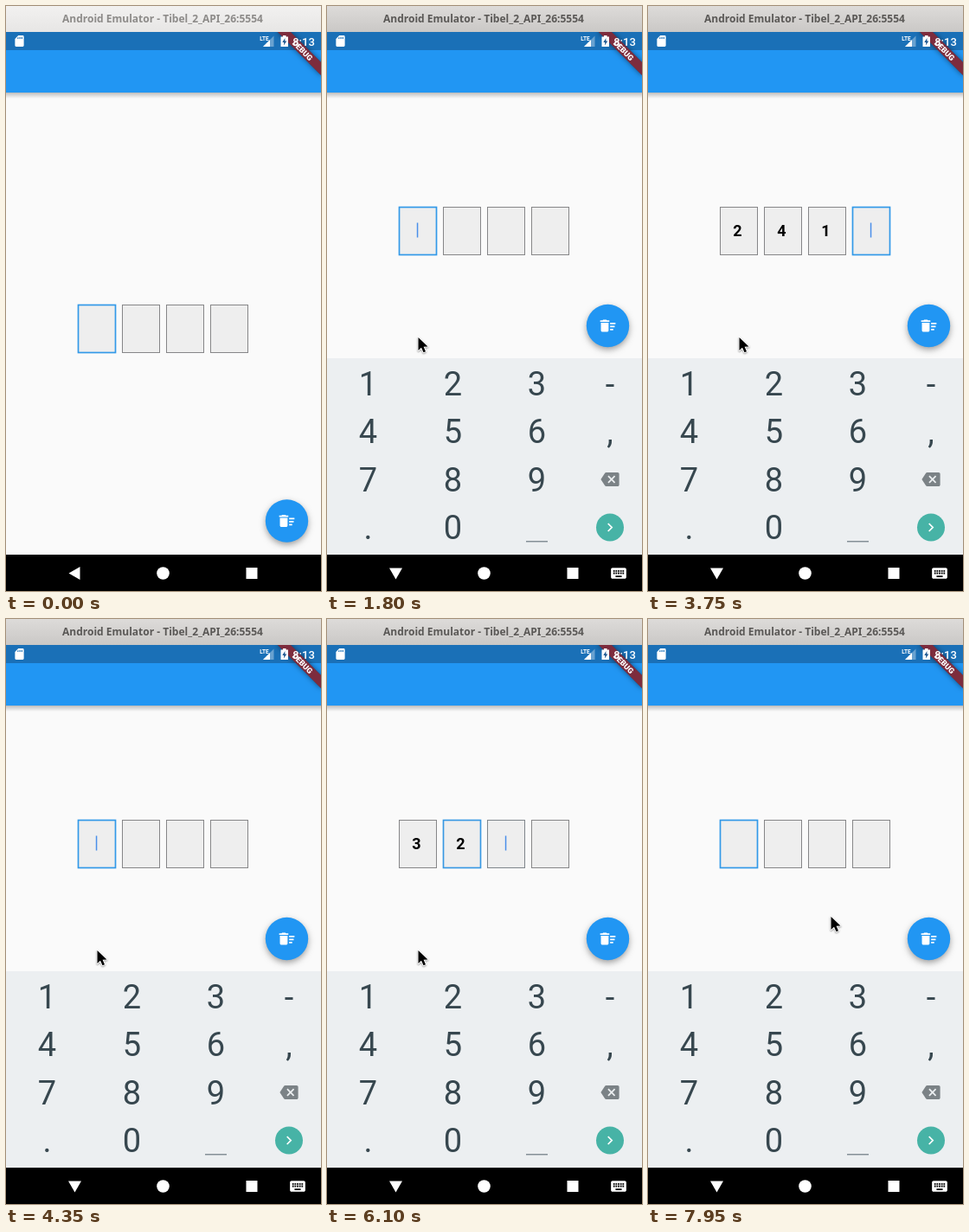
Animation of 364x676 px, one loop 8 s. Source, as an HTML page with a canvas:

```html
<!DOCTYPE html>
<html lang="en">
<head>
<meta charset="utf-8">
<title>Pin entry</title>
<style>
html, body { margin: 0; width: 364px; height: 676px; overflow: hidden; background: #fafafa; }
canvas { display: block; width: 364px; height: 676px; }
</style>
</head>
<body>
<canvas id="stage"></canvas>
<script>
const W = 364, H = 676, LOOP = 8000, DP = 0.885;
const BLUE = '#2196f3';
const canvas = document.getElementById('stage');
const ctx = canvas.getContext('2d');
const ratio = window.devicePixelRatio || 1;
canvas.width = W * ratio;
canvas.height = H * ratio;

const ICONS = {
  sweep: 'M15 16h4v2h-4zm0-8h7v2h-7zm0 4h6v2h-6zM3 18c0 1.1.9 2 2 2h6c1.1 0 2-.9 2-2V8H3v10zM14 5h-3l-1-1H6L5 5H2v2h12z',
  keys: 'M20 5H4c-1.1 0-2 .9-2 2v10c0 1.1.9 2 2 2h16c1.1 0 2-.9 2-2V7c0-1.1-.9-2-2-2zm-9 3h2v2h-2zm0 3h2v2h-2zM8 8h2v2H8zm0 3h2v2H8zm-1 2H5v-2h2zm0-3H5V8h2zm9 7H8v-2h8zm0-4h-2v-2h2zm0-3h-2V8h2zm3 3h-2v-2h2zm0-3h-2V8h2z',
  erase: 'M22 3H7c-.7 0-1.2.3-1.6.9L0 12l5.4 8.1c.4.5.9.9 1.6.9h15c1.1 0 2-.9 2-2V5c0-1.1-.9-2-2-2zm-3 12.6L17.6 17 14 13.4 10.4 17 9 15.6 12.6 12 9 8.4 10.4 7 14 10.6 17.6 7 19 8.4 15.4 12z',
  next: 'M10 6L8.6 7.4 13.2 12l-4.6 4.6L10 18l6-6z',
  card: 'M18 2h-8L4 8v12c0 1.1.9 2 2 2h12c1.1 0 2-.9 2-2V4c0-1.1-.9-2-2-2zM8.5 8V5.500h1.800V8zM12 8V5h1.800v3zM15.500 8V5h1.800v3z'
};
for (const k in ICONS) ICONS[k] = new Path2D(ICONS[k]);

// Field contents over time; t is when each edit lands.
const edits = [[1400, '']];
function typeAndClear(word, typed, cleared) {
  typed.forEach((t, i) => edits.push([t, word.slice(0, i + 1)]));
  cleared.forEach((t, i) => edits.push([t, word.slice(0, 3 - i)]));
}
typeAndClear('2413', [2300, 2500, 2720, 2830], [3750, 3890, 4020, 4150]);
typeAndClear('5163', [4600, 4700, 5050, 5200], [5350, 5450, 5550, 5640]);
typeAndClear('3214', [5900, 6090, 6180, 6250], [6650, 6800, 6940, 7080]);

const clamp = v => Math.max(0, Math.min(1, v));
const mix = (a, b, p) => a + (b - a) * p;
const smooth = p => p * p * (3 - 2 * p);

function rect(x, y, w, h, fill) {
  ctx.fillStyle = fill;
  ctx.fillRect(x, y, w, h);
}

function disc(x, y, r, fill) {
  ctx.fillStyle = fill;
  ctx.beginPath();
  ctx.arc(x, y, r, 0, 7);
  ctx.fill();
}

function poly(points, fill) {
  ctx.fillStyle = fill;
  ctx.beginPath();
  points.forEach(([x, y]) => ctx.lineTo(x, y));
  ctx.closePath();
  ctx.fill();
}

function text(str, x, y, font, fill, align = 'center') {
  ctx.font = font;
  ctx.fillStyle = fill;
  ctx.textAlign = align;
  ctx.fillText(str, x, y);
}

function icon(name, cx, cy, scale, fill) {
  ctx.save();
  ctx.translate(cx, cy);
  ctx.scale(scale, scale);
  ctx.translate(-12, -12);
  ctx.fillStyle = fill;
  ctx.fill(ICONS[name], 'evenodd');
  ctx.restore();
}

function fade(y, h, top, bottom) {
  const g = ctx.createLinearGradient(0, y, 0, y + h);
  g.addColorStop(0, top);
  g.addColorStop(1, bottom);
  rect(0, y, W, h, g);
}

function shadow(color, blur, dy) {
  ctx.shadowColor = color;
  ctx.shadowBlur = blur * ratio;
  ctx.shadowOffsetY = dy * ratio;
}

function titleBar(active) {
  if (active) fade(0, 30, '#dddbd9', '#cac8c6');
  else fade(0, 30, '#f2f1f0', '#e7e6e5');
  text('Android Emulator - Tibel_2_API_26:5554', 65, 19,
    'bold 12px "Noto Sans", "Open Sans", sans-serif', active ? '#5a5856' : '#8d8b89', 'left');
}

function appBar() {
  rect(0, 100, W, 1, 'rgba(0,0,0,.24)');
  fade(101, 6, 'rgba(0,0,0,.2)', 'rgba(0,0,0,0)');
  rect(0, 30, W, 21, '#1a70b7');
  rect(0, 51, W, 49, BLUE);
}

function debugBanner() {
  ctx.save();
  ctx.beginPath();
  ctx.rect(0, 30, W, 604);
  ctx.clip();
  ctx.translate(W, 30);
  ctx.rotate(Math.PI / 4);
  const x = -40 * DP, y = 28 * DP, w = 80 * DP, h = 12 * DP;
  ctx.save();
  shadow('rgba(0,0,0,.5)', 6, 0);
  rect(x, y, w, h, '#1a4a78');
  ctx.restore();
  rect(x, y, w, h, 'rgba(183,28,28,.63)');
  text('DEBUG', 0, y + 8.6, '900 9px Roboto, sans-serif', '#fff');
  ctx.restore();
}

function statusIcons() {
  icon('card', 15.500, 40.500, 0.64, '#fff');
  text('LTE', 298.500, 39.500, 'bold 6.5px Roboto, sans-serif', '#fff');
  poly([[297, 47], [309.500, 34.500], [309.500, 47]], 'rgba(255,255,255,.35)');
  poly([[297, 47], [305, 39], [305, 47]], '#fff');
  rect(317.500, 35.500, 8.500, 11.500, '#fff');
  rect(320, 34, 3.500, 2, '#fff');
  poly([[322.500, 37], [319.300, 42], [321.300, 42], [321, 45.500], [324.300, 40.500], [322.300, 40.500]], '#1a5590');
  text('8:13', 344, 45.500, '500 13px Roboto, sans-serif', '#fff');
}

function fields(t, top) {
  let value = '', focus = 0, last = 0, since = -1e4;
  for (const [when, word] of edits) {
    if (when > t) break;
    value = word;
    const f = Math.min(word.length, 3);
    if (f !== focus || when === 1400) {
      last = focus;
      focus = f;
      since = when;
    }
  }
  const p = clamp((t - since) / 200);
  for (let i = 0; i < 4; i++) {
    const x = Math.floor(83.1 + 51.2 * i);
    const glow = i === focus ? (last === focus ? 1 : p) : i === last ? 1 - p : 0;
    rect(x, top, 44, 56, '#eee');
    ctx.lineWidth = 1 + 0.7 * glow;
    ctx.strokeStyle = `rgb(${mix(134, 50, glow)},${mix(134, 153, glow)},${mix(136, 232, glow)})`;
    ctx.strokeRect(x + 0.5, top + 0.5, 43, 55);
    if (value[i]) text(value[i], x + 20.300, top + 34, 'bold 18px Roboto, sans-serif', '#000');
  }
  const blink = Math.floor((t - since) / 500) % 2 === 0;
  if (t >= 1400 && blink) {
    const x = Math.floor(83.1 + 51.2 * focus) + (value.length === 4 ? 26.500 : 20.800);
    rect(x, top + 18.500, 1.500, 17, '#4a8fea');
  }
}

function actionButton(cy) {
  ctx.save();
  shadow('rgba(0,0,0,.36)', 7, 3);
  disc(324.500, cy, 24.700, BLUE);
  ctx.restore();
  icon('sweep', 324.500, cy, DP, '#fff');
}

function keyboard(dy) {
  ctx.save();
  ctx.beginPath();
  ctx.rect(0, 30, W, 604);
  ctx.clip();
  ctx.translate(0, dy);
  rect(0, 407, W, 227, '#eceff1');
  ['123-', '456,', '789', '.0'].forEach((row, r) => {
    [...row].forEach((key, c) => {
      text(key, [47.500, 145.500, 242.500, 327][c], 449.500 + 55.600 * r,
        '38px Roboto, sans-serif', '#37474f');
    });
  });
  rect(230, 618, 25, 1.500, '#859097');
  icon('erase', 327, 547, DP, '#7b8286');
  disc(327, 602.500, 16, '#47b3a6');
  icon('next', 327, 602.500, 0.85, '#fff');
  ctx.restore();
}

function navBar(open) {
  rect(0, 634, W, 42, '#000');
  if (open) {
    poly([[72, 649.500], [87, 649.500], [79.500, 662.500]], '#fff');
    icon('keys', 337, 655.500, DP, '#fff');
  } else {
    poly([[72.500, 655.500], [85.500, 648], [85.500, 663]], '#fff');
  }
  disc(181.500, 655.500, 7.300, '#fff');
  rect(277.500, 649, 13, 13, '#fff');
}

// Pointer stops: time, x, y
const route = [[650, -14, 440], [1050, 99, 386], [1500, 99, 386], [1700, 105, 382],
  [7800, 105, 382], [7950, 211, 343], [8000, 211, 343]];

function pointer(t) {
  const n = route.findIndex(s => s[0] > t);
  if (n < 1) return;
  const [t0, x0, y0] = route[n - 1], [t1, x1, y1] = route[n];
  const p = smooth((t - t0) / (t1 - t0));
  ctx.save();
  ctx.translate(mix(x0, x1, p), mix(y0, y1, p));
  ctx.beginPath();
  [[0.5, 1], [0.5, 16], [4, 12.700], [6.500, 18.300], [9, 17.200], [6.600, 11.700], [11.500, 11.500]]
    .forEach(([x, y]) => ctx.lineTo(x, y));
  ctx.closePath();
  ctx.lineJoin = 'round';
  ctx.lineWidth = 1.800;
  ctx.strokeStyle = '#fff';
  ctx.save();
  shadow('rgba(0,0,0,.4)', 2, 1);
  ctx.stroke();
  ctx.restore();
  ctx.fillStyle = '#000';
  ctx.fill();
  ctx.restore();
}

function draw(t) {
  ctx.setTransform(ratio, 0, 0, ratio, 0, 0);
  const open = t >= 1450;
  const slide = 1 - Math.pow(1 - clamp((t - 1400) / 250), 3);
  rect(0, 0, W, H, '#fafafa');
  appBar();
  fields(t, open ? 232 : 345);
  actionButton(open ? 369.500 : 595);
  debugBanner();
  statusIcons();
  if (slide > 0) keyboard(227 * (1 - slide));
  navBar(open);
  titleBar(t >= 1300);
  pointer(t);
}

function tick() {
  draw(performance.now() % LOOP);
  requestAnimationFrame(tick);
}
tick();
</script>
</body>
</html>
```
